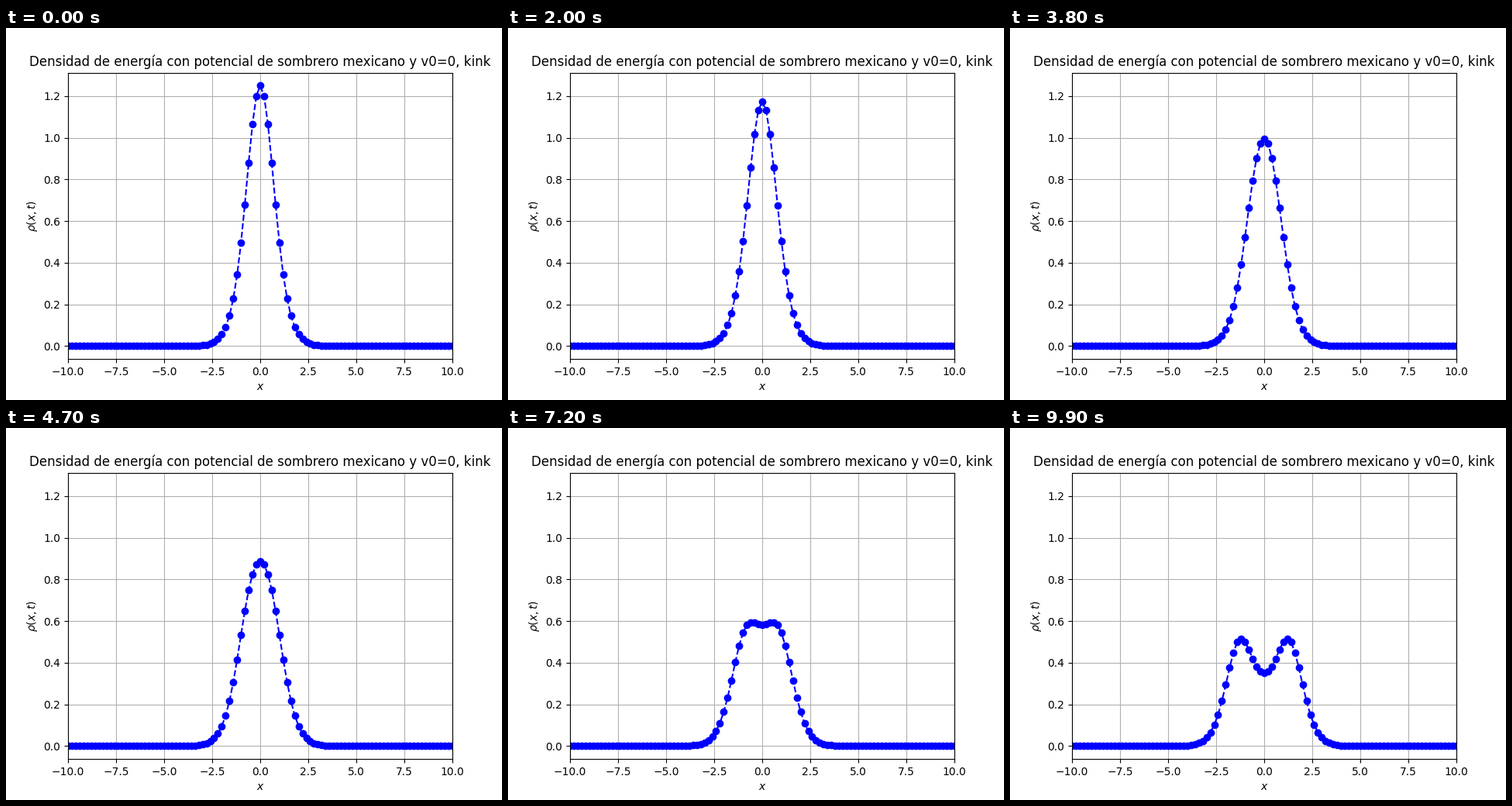
These frames come from a looping animation (640x480 px, 10000 ms). A matplotlib script:

```python
import numpy as np
import matplotlib.pyplot as plt
from matplotlib.animation import FuncAnimation

FRAMES = 100
DT = 0.01
STRIDE = 10  # grid points per plotted marker

x = np.linspace(-10, 10, 1001)
dx = x[1] - x[0]


def accel(phi):
    """phi_xx - phi + phi^3, with the ends held fixed."""
    acc = np.zeros_like(phi)
    mid = phi[1:-1]
    acc[1:-1] = (phi[2:] - 2 * mid + phi[:-2]) / dx**2 - mid + mid**3
    return acc


def density(phi):
    grad = np.gradient(phi, dx)
    return 2 * grad**2 + 0.25 * (phi**2 - 1)**2


def evolve():
    """Leapfrog the kink from rest and return the density at each step."""
    phi = np.tanh(x / np.sqrt(2))
    prev = phi + 0.5 * DT**2 * accel(phi)
    rows = []
    for _ in range(FRAMES):
        rows.append(density(phi)[::STRIDE])
        phi, prev = 2 * phi - prev + DT**2 * accel(phi), phi
    return rows


rho = evolve()

fig, ax = plt.subplots(figsize=(6.4, 4.8), dpi=100)
line, = ax.plot(x[::STRIDE], rho[0], "bo--")
ax.set_xlim(-10, 10)
ax.set_ylim(-0.0625, 1.3125)
ax.set_xlabel("$x$")
ax.set_ylabel(r"$\rho(x,t)$")
ax.set_title("Densidad de energía con potencial de sombrero mexicano y v0=0, kink")
ax.grid(True)


def update(i):
    line.set_ydata(rho[i])
    return line,


anim = FuncAnimation(fig, update, frames=FRAMES, interval=100,
                     repeat=True, repeat_delay=0)
plt.show()
```
